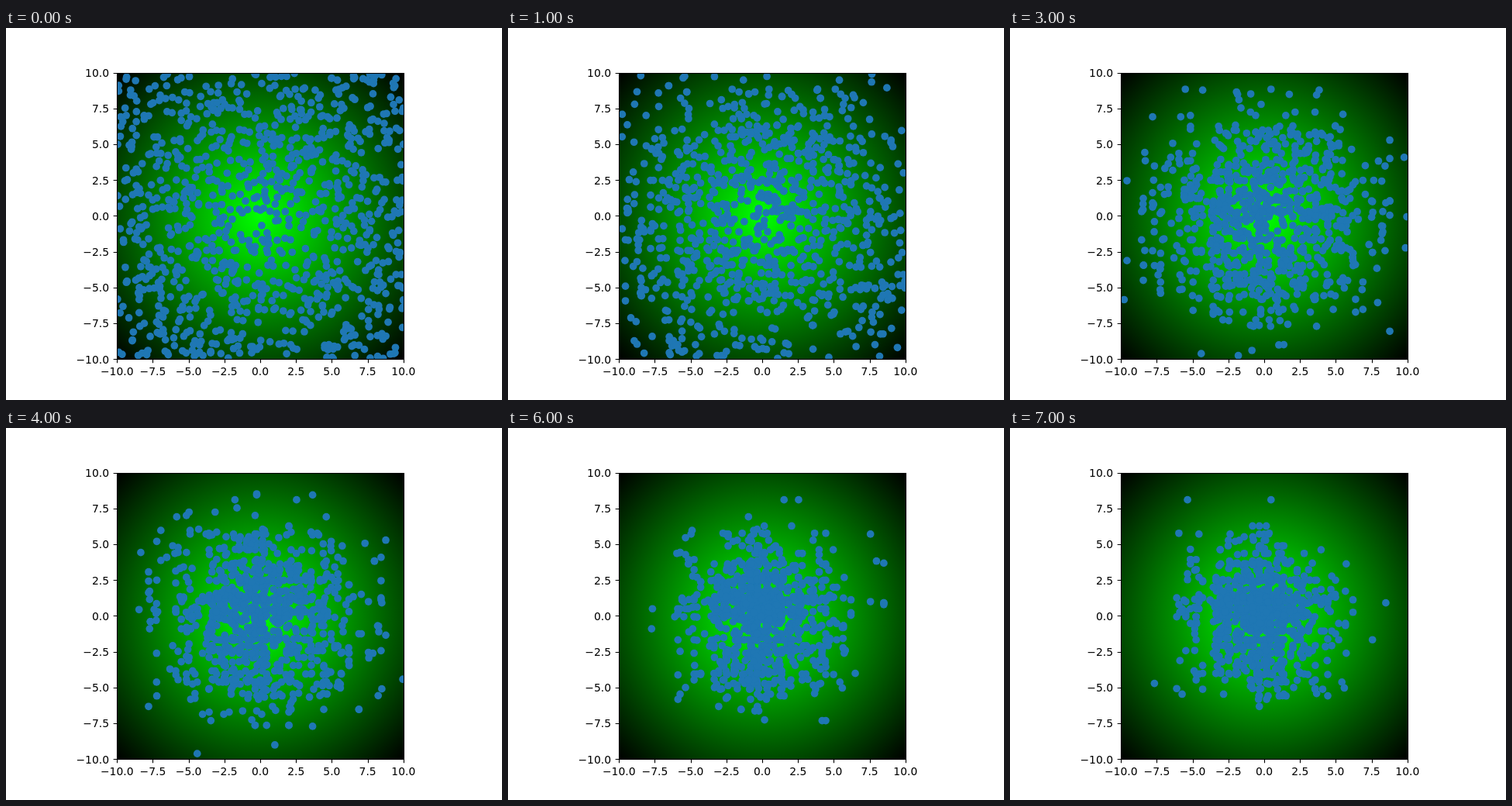
These frames come from a looping animation (640x480 px, 8 s). An HTML page with a canvas:

```html
<!DOCTYPE html>
<html>
<head>
<meta charset="utf-8">
<style>
  html, body { margin: 0; width: 640px; height: 480px; overflow: hidden; background: #fff; }
  canvas { display: block; }
</style>
</head>
<body>
<canvas id="plot" width="640" height="480"></canvas>
<script>
const ctx = document.getElementById('plot').getContext('2d');
const COUNT = 1000, GENERATIONS = 8, STEP_MS = 1000;
const LEFT = 143.2, TOP = 57.6, SIZE = 369.6;
const px = x => LEFT + (x + 10) / 20 * SIZE;
const py = y => TOP + (10 - y) / 20 * SIZE;
const snap = v => Math.round(v) + 0.5;

let seed = 20;
function random() {
  seed = (seed * 1664525 + 1013904223) % 4294967296;
  return seed / 4294967296;
}

// Fitness falls linearly from the centre to the corners.
const fitness = p => 1 - Math.hypot(p.x, p.y) / Math.hypot(10, 10);

function select(population) {
  for (;;) {
    const p = population[Math.floor(random() * COUNT)];
    if (random() < fitness(p)) return p;
  }
}

// A child keeps its parent's place or takes y from a second parent.
function breed(population) {
  return population.map(() => {
    const a = select(population);
    return random() < 0.6 ? { x: a.x, y: select(population).y } : a;
  });
}

const generations = [Array.from({ length: COUNT }, () => ({
  x: random() * 20 - 10, y: random() * 20 - 10
}))];
while (generations.length < GENERATIONS) generations.push(breed(generations.at(-1)));

const glow = ctx.createRadialGradient(px(0), py(0), 0, px(0), py(0), SIZE / Math.SQRT2);
glow.addColorStop(0, '#0f0');
glow.addColorStop(1, '#000');

function drawAxes() {
  ctx.strokeStyle = ctx.fillStyle = '#000';
  ctx.lineWidth = 1.11;
  ctx.font = '13.89px "DejaVu Sans", sans-serif';
  const x0 = snap(px(-10)), x1 = snap(px(10)), y0 = snap(py(10)), y1 = 427.5;
  ctx.strokeRect(x0, y0, x1 - x0, y1 - y0);
  ctx.beginPath();
  for (let v = -10; v <= 10; v += 2.5) {
    const label = v.toFixed(1).replace('-', '\u2212');
    const x = snap(px(v)), y = snap(py(v));
    ctx.moveTo(x, y1);
    ctx.lineTo(x, y1 + 4.86);
    ctx.moveTo(x0, y);
    ctx.lineTo(x0 - 4.86, y);
    ctx.textAlign = 'center';
    ctx.fillText(label, px(v), 448);
    ctx.textAlign = 'right';
    ctx.fillText(label, 133, Math.round(py(v) + 5.3));
  }
  ctx.stroke();
}

function draw(population) {
  ctx.fillStyle = '#fff';
  ctx.fillRect(0, 0, 640, 480);
  ctx.save();
  ctx.beginPath();
  ctx.rect(143, 58, 370, 369);
  ctx.clip();
  ctx.fillStyle = glow;
  ctx.fillRect(143, 58, 370, 369);
  ctx.fillStyle = '#1f77b4';
  for (const p of population) {
    ctx.beginPath();
    ctx.arc(px(p.x), py(p.y), 4.86, 0, 2 * Math.PI);
    ctx.fill();
  }
  ctx.restore();
  drawAxes();
}

let shown = -1;
function tick() {
  const current = Math.floor(performance.now() / STEP_MS) % GENERATIONS;
  if (current !== shown) draw(generations[shown = current]);
  requestAnimationFrame(tick);
}
tick();
</script>
</body>
</html>
```
